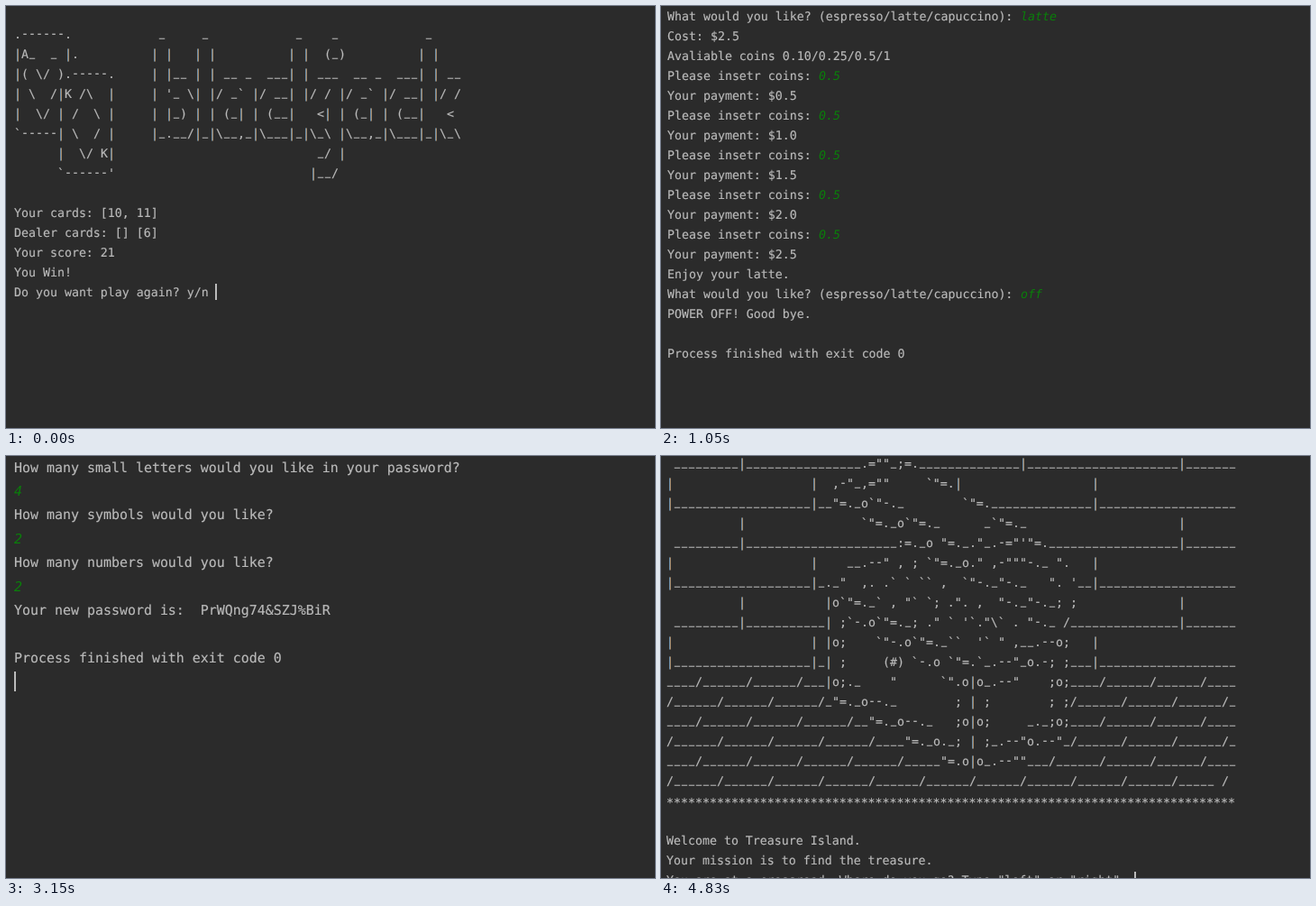
An HTML page for the animation above (5250 ms loop, 720x468 px).

```html
<!DOCTYPE html>
<html lang="en">
<head>
<meta charset="utf-8">
<title>Console games</title>
<style>
  html, body { margin: 0; width: 100%; height: 100%; overflow: hidden; background: #2b2b2b; }
  svg { display: block; width: 720px; height: 468px; }
  text {
    font-family: "DejaVu Sans Mono", "Noto Sans Mono", monospace;
    white-space: pre; text-rendering: geometricPrecision;
    fill: #bbbbbb; stroke: #bbbbbb; stroke-width: 0.15px;
  }
  .input { fill: #0a7f0a; stroke: none; font-style: italic; }
  .bar { fill: url(#fringe); stroke: url(#fringe); stroke-width: 0.5px; }
  .rule { stroke-width: 0.5px; }
</style>
</head>
<body>
<svg id="stage" viewBox="0 0 720 468">
  <defs>
    <linearGradient id="fringe">
      <stop offset="0.5" stop-color="#7ba6c9"/>
      <stop offset="0.5" stop-color="#c9a57b"/>
    </linearGradient>
  </defs>
  <rect width="720" height="468" fill="#2b2b2b"/>
</svg>

<!-- Text after ~ is typed by the user -->
<pre hidden>
.------.            _     _            _    _            _
|A_  _ |.          | |   | |          | |  (_)          | |
|( \/ ).-----.     | |__ | | __ _  ___| | ___  __ _  ___| | __
| \  /|K /\  |     | '_ \| |/ _` |/ __| |/ / |/ _` |/ __| |/ /
|  \/ | /  \ |     | |_) | | (_| | (__|   &lt;| | (_| | (__|   &lt;
`-----| \  / |     |_.__/|_|\__,_|\___|_|\_\ |\__,_|\___|_|\_\
      |  \/ K|                            _/ |
      `------'                           |__/

Your cards: [10, 11]
Dealer cards: [] [6]
Your score: 21
You Win!
Do you want play again? y/n </pre>

<pre hidden>
What would you like? (espresso/latte/capuccino): ~latte
Cost: $2.5
Avaliable coins 0.10/0.25/0.5/1
Please insetr coins: ~0.5
Your payment: $0.5
Please insetr coins: ~0.5
Your payment: $1.0
Please insetr coins: ~0.5
Your payment: $1.5
Please insetr coins: ~0.5
Your payment: $2.0
Please insetr coins: ~0.5
Your payment: $2.5
Enjoy your latte.
What would you like? (espresso/latte/capuccino): ~off
POWER OFF! Good bye.

Process finished with exit code 0</pre>

<pre hidden>
    _______
---'   ____)
      (_____)
      (_____)
      (____)
---.__(___)

Computer chose:

    _______
---'   ____)____
          ______)
       __________)
      (____)
---.__(___)

You Win!

Process finished with exit code 0</pre>

<pre hidden>
How many small letters would you like in your password?
~4
How many symbols would you like?
~2
How many numbers would you like?
~2
Your new password is:  PrWQng74&amp;SZJ%BiR

Process finished with exit code 0</pre>

<pre hidden>
 _________|________________.=""_;=.______________|_____________________|_______
|                   |  ,-"_,=""     `"=.|                  |
|___________________|__"=._o`"-._        `"=.______________|___________________
          |                `"=._o`"=._      _`"=._                     |
 _________|_____________________:=._o "=._."_.-="'"=.__________________|_______
|                   |    __.--" , ; `"=._o." ,-"""-._ ".   |
|___________________|_._"  ,. .` ` `` ,  `"-._"-._   ". '__|___________________
          |           |o`"=._` , "` `; .". ,  "-._"-._; ;              |
 _________|___________| ;`-.o`"=._; ." ` '`."\` . "-._ /_______________|_______
|                   | |o;    `"-.o`"=._``  '` " ,__.--o;   |
|___________________|_| ;     (#) `-.o `"=.`_.--"_o.-; ;___|___________________
____/______/______/___|o;._    "      `".o|o_.--"    ;o;____/______/______/____
/______/______/______/_"=._o--._        ; | ;        ; ;/______/______/______/_
____/______/______/______/__"=._o--._   ;o|o;     _._;o;____/______/______/____
/______/______/______/______/____"=._o._; | ;_.--"o.--"_/______/______/______/_
____/______/______/______/______/_____"=.o|o_.--""___/______/______/______/____
/______/______/______/______/______/______/______/______/______/______/_____ /
*******************************************************************************

Welcome to Treasure Island.
Your mission is to find the treasure.
You are at a crossroad. Where do you go? Type "left" or "right". </pre>

<script>
const HOLD = 1050;
const ADVANCE = 0.602; // glyph width in em
const RULE_SIZE = 10;  // small underscores leave a gap between cells
const LIFT = { '-': 1.2, '*': -2, '_': 1.66 };
const CLASSES = { '~': 'input', '|': 'bar', '_': 'rule' };
const SCREENS = [
  { x: 9, y: 36, cell: 8, pitch: 22, caret: [232, 308, 18] },
  { x: 7, y: 16, cell: 8, pitch: 22 },
  { x: 9, y: 5, cell: 8, pitch: 22, caret: [9, 409, 18] },
  { x: 9, y: 17.5, cell: 9, pitch: 26.4, caret: [9, 239, 22] },
  { x: 6, y: 13, cell: 8, pitch: 22, caret: [525, 461, 18] }
];
const stage = document.getElementById('stage');
const sources = document.querySelectorAll('pre');

function add(parent, tag, attrs, text = '') {
  const node = document.createElementNS('http://www.w3.org/2000/svg', tag);
  for (const key in attrs) node.setAttribute(key, attrs[key]);
  node.textContent = text;
  return parent.appendChild(node);
}

function drawLine(group, line, y, { x, cell }) {
  let col = 0;
  for (const run of line.match(/~.*|\||_+|\*+|-+|[^~|_*-]+/g) || []) {
    const kind = run[0];
    const text = kind === '~' ? run.slice(1) : run;
    const attrs = { x: x + col * cell, y: y - (LIFT[kind] || 0), class: CLASSES[kind] || '' };
    if (kind === '_') {
      const gap = cell - RULE_SIZE * ADVANCE;
      attrs.x += gap / 2;
      attrs['font-size'] = RULE_SIZE;
      attrs['letter-spacing'] = gap;
    }
    add(group, 'text', attrs, text);
    col += text.length;
  }
}

const groups = SCREENS.map((screen, i) => {
  const group = add(stage, 'g', { 'font-size': screen.cell / ADVANCE });
  sources[i].textContent.split('\n').forEach((line, row) =>
    drawLine(group, line, screen.y + row * screen.pitch, screen));
  if (screen.caret) {
    const [x, y, height] = screen.caret;
    add(group, 'rect', { x, y, width: 2, height, fill: '#bbbbbb' });
  }
  return group;
});

function render(time) {
  const current = Math.floor(time / HOLD) % groups.length;
  groups.forEach((group, i) => group.setAttribute('display', i === current ? 'inline' : 'none'));
}

const start = performance.now();
function tick() {
  render(performance.now() - start);
  requestAnimationFrame(tick);
}
tick();
</script>
</body>
</html>
```
